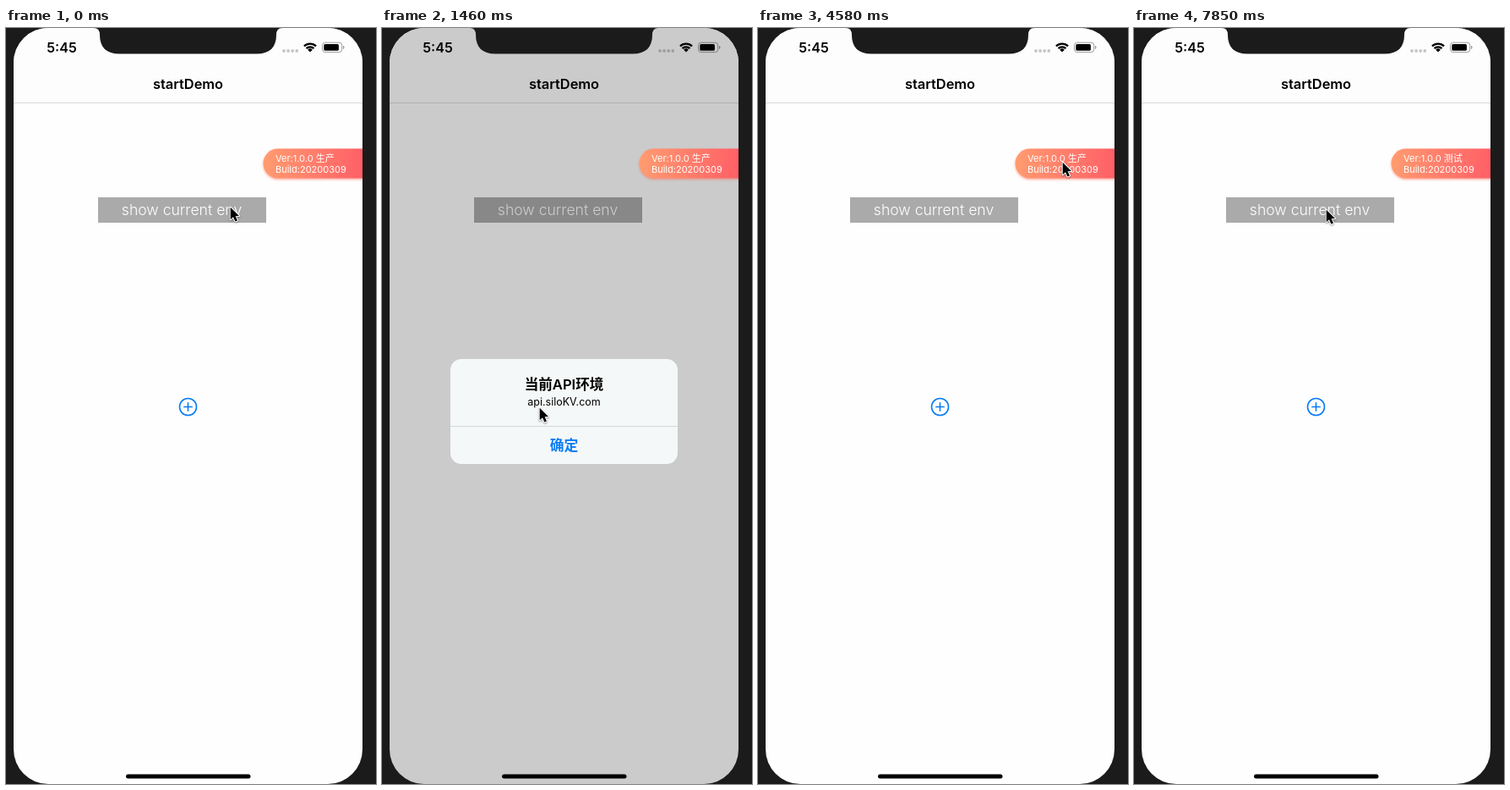
An HTML page with a canvas that plays this animation: 438x893 px, repeating every 8000 ms.

```html
<!DOCTYPE html>
<html lang="zh-CN">
<head>
<meta charset="utf-8">
<style>
html, body { margin: 0; width: 100%; height: 100%; overflow: hidden; background: #1b1b1b; }
canvas { display: block; width: 438px; height: 893px; }
</style>
</head>
<body>
<canvas id="stage"></canvas>
<script>
const W = 438, H = 893, LOOP = 8000, STEP = 148.2;
const canvas = document.getElementById('stage');
const ctx = canvas.getContext('2d');
const dpr = window.devicePixelRatio || 1;
canvas.width = W * dpr;
canvas.height = H * dpr;

const FONT = 'Inter, "Noto Sans CJK SC", "Noto Sans CJK", sans-serif';
const BLUE = '#0a7cf5';

const POINTER = [
  [0, 266, 212], [3, 266, 212], [8, 177, 446], [9, 184, 448], [10, 187, 449],
  [12, 187, 455], [13, 187, 455], [17, 212, 491], [22, 212, 491], [29, 319, 167],
  [30, 347, 162], [31, 361, 159], [34, 364, 161], [40, 364, 161], [43, 380, 149],
  [46, 386, 157], [48, 365, 162], [53, 228, 215]
];
const ALERT = [[0, 0], [1, .53], [2, .92], [3, 1], [20, 1], [21, .55], [22, .1], [23, 0]];

function track(keys, n) {
  let i = 0;
  while (i < keys.length - 2 && n >= keys[i + 1][0]) i++;
  const a = keys[i], b = keys[i + 1];
  let p = Math.min(1, Math.max(0, (n - a[0]) / (b[0] - a[0])));
  p = p * p * (3 - 2 * p);
  return a.slice(1).map((v, k) => v + (b[k + 1] - v) * p);
}

function text(str, x, y, size, weight, color, align = 'center') {
  ctx.font = `${weight} ${size}px ${FONT}`;
  ctx.fillStyle = color;
  ctx.textAlign = align;
  ctx.fillText(str, x, y);
}

function box(x, y, w, h, color, r = 0) {
  ctx.fillStyle = color;
  ctx.beginPath();
  ctx.roundRect(x, y, w, h, r);
  ctx.fill();
}

function dot(x, y, r, color) {
  ctx.fillStyle = color;
  ctx.beginPath();
  ctx.arc(x, y, r, 0, Math.PI * 2);
  ctx.fill();
}

function wifi(x, y) {
  const a = Math.PI * 1.25, b = Math.PI * 1.75;
  ctx.strokeStyle = '#000';
  ctx.lineWidth = 2.3;
  for (const r of [6.3, 10]) {
    ctx.beginPath();
    ctx.arc(x, y, r, a, b);
    ctx.stroke();
  }
  ctx.fillStyle = '#000';
  ctx.beginPath();
  ctx.moveTo(x, y);
  ctx.arc(x, y, 4, a, b);
  ctx.fill();
}

function statusBar() {
  text('5:45', 66, 28.8, 16, 600, '#000');
  for (let i = 0; i < 4; i++) dot(329 + i * 5.1, 27, 1.9, '#c6c6c6');
  wifi(360, 28.6);
  ctx.strokeStyle = '#9c9c9c';
  ctx.lineWidth = 1;
  ctx.beginPath();
  ctx.roundRect(374.5, 17.2, 23.2, 11.4, 3.2);
  ctx.stroke();
  box(376.3, 19, 17.6, 7.8, '#000', 1.6);
  box(399, 21, 1.4, 4, '#9c9c9c', [0, 1.4, 1.4, 0]);
}

function page() {
  box(0, 0, W, H, '#fefefe');
  box(0, 0, W, 88, '#fdfdfd');
  box(0, 88, W, 1, '#dadada');
  statusBar();
  text('startDemo', 215.5, 72.3, 16.4, 600, '#000');
  box(109, 200, 199, 30, '#aaa');
  text('show current env', 208, 221.4, 17.6, 300, '#fff');
  ctx.strokeStyle = BLUE;
  ctx.lineWidth = 1.6;
  ctx.beginPath();
  ctx.arc(215.5, 447.5, 10, 0, Math.PI * 2);
  ctx.moveTo(210.2, 447.5);
  ctx.lineTo(220.8, 447.5);
  ctx.moveTo(215.5, 442.2);
  ctx.lineTo(215.5, 452.8);
  ctx.stroke();
}

function badge(env) {
  const g = ctx.createLinearGradient(304, 0, 422, 0);
  g.addColorStop(0, '#ff9c70');
  g.addColorStop(1, '#ff6067');
  ctx.save();
  ctx.shadowColor = 'rgba(255,110,90,.6)';
  ctx.shadowBlur = 3 * dpr;
  ctx.shadowOffsetY = 1.5 * dpr;
  box(304.5, 142.5, 140, 35, g, 17.5);
  ctx.restore();
  text('Ver:1.0.0 ' + env, 319, 157.8, 11, 400, '#fff', 'left');
  text('Build:20200309', 319, 171, 11, 400, '#fff', 'left');
}

function alertBox(p, showing, pressed) {
  const s = showing ? 1.2 - .2 * p : 1;
  ctx.save();
  ctx.globalAlpha = p;
  ctx.translate(215.5, 452.8);
  ctx.scale(s, s);
  ctx.translate(-215.5, -452.8);
  box(81, 391, 269, 124, '#f5f8f8', 13);
  if (pressed) box(81, 470, 269, 45, '#dee3e4', [0, 0, 13, 13]);
  box(81, 470, 269, 1, '#d3d8d9');
  text('当前API环境', 215.5, 427, 16.6, 600, '#000');
  text('api.siloKV.com', 215.5, 446.3, 12.5, 400, '#000');
  text('确定', 215.5, 499.2, 16.8, 600, BLUE);
  ctx.restore();
}

function notch() {
  ctx.fillStyle = '#1b1b1b';
  ctx.beginPath();
  ctx.moveTo(104, -1);
  ctx.lineTo(104, 0);
  ctx.quadraticCurveTo(111, 0, 111, 8);
  ctx.bezierCurveTo(111, 23, 119, 30.5, 134, 30.5);
  ctx.lineTo(297, 30.5);
  ctx.bezierCurveTo(312, 30.5, 320, 23, 320, 8);
  ctx.quadraticCurveTo(320, 0, 327, 0);
  ctx.lineTo(327, -1);
  ctx.fill();
}

function pointer(x, y) {
  ctx.save();
  ctx.translate(x - .3, y - .2);
  ctx.beginPath();
  [[0, 0], [0, 14.4], [3.3, 11.4], [5.7, 16.8], [8.3, 15.7], [5.9, 10.4], [10.3, 10.2]]
    .forEach(p => ctx.lineTo(...p));
  ctx.closePath();
  ctx.lineJoin = 'round';
  ctx.lineWidth = 2;
  ctx.strokeStyle = '#fff';
  ctx.shadowColor = 'rgba(0,0,0,.4)';
  ctx.shadowBlur = 2 * dpr;
  ctx.shadowOffsetY = dpr;
  ctx.stroke();
  ctx.shadowColor = 'transparent';
  ctx.fillStyle = '#000';
  ctx.fill();
  ctx.restore();
}

function draw(ms) {
  const n = Math.min(53, Math.floor((ms % LOOP + 24) / STEP));
  const [p] = track(ALERT, n);
  ctx.setTransform(dpr, 0, 0, dpr, 0, 0);
  box(0, 0, W, H, '#1b1b1b');
  ctx.save();
  ctx.beginPath();
  ctx.roundRect(9, 0, 413, 893, 41);
  ctx.clip();
  page();
  box(0, 0, W, H, `rgba(0,0,0,${.2 * p})`);
  badge(n < 37 ? '生产' : '测试');
  if (p > 0) alertBox(p, n < 10, n >= 19);
  box(142, 881.5, 147.5, 5, '#000', 2.5);
  ctx.restore();
  notch();
  pointer(...track(POINTER, n));
}

const start = performance.now();
function loop() {
  draw(performance.now() - start);
  requestAnimationFrame(loop);
}
loop();
</script>
</body>
</html>
```
